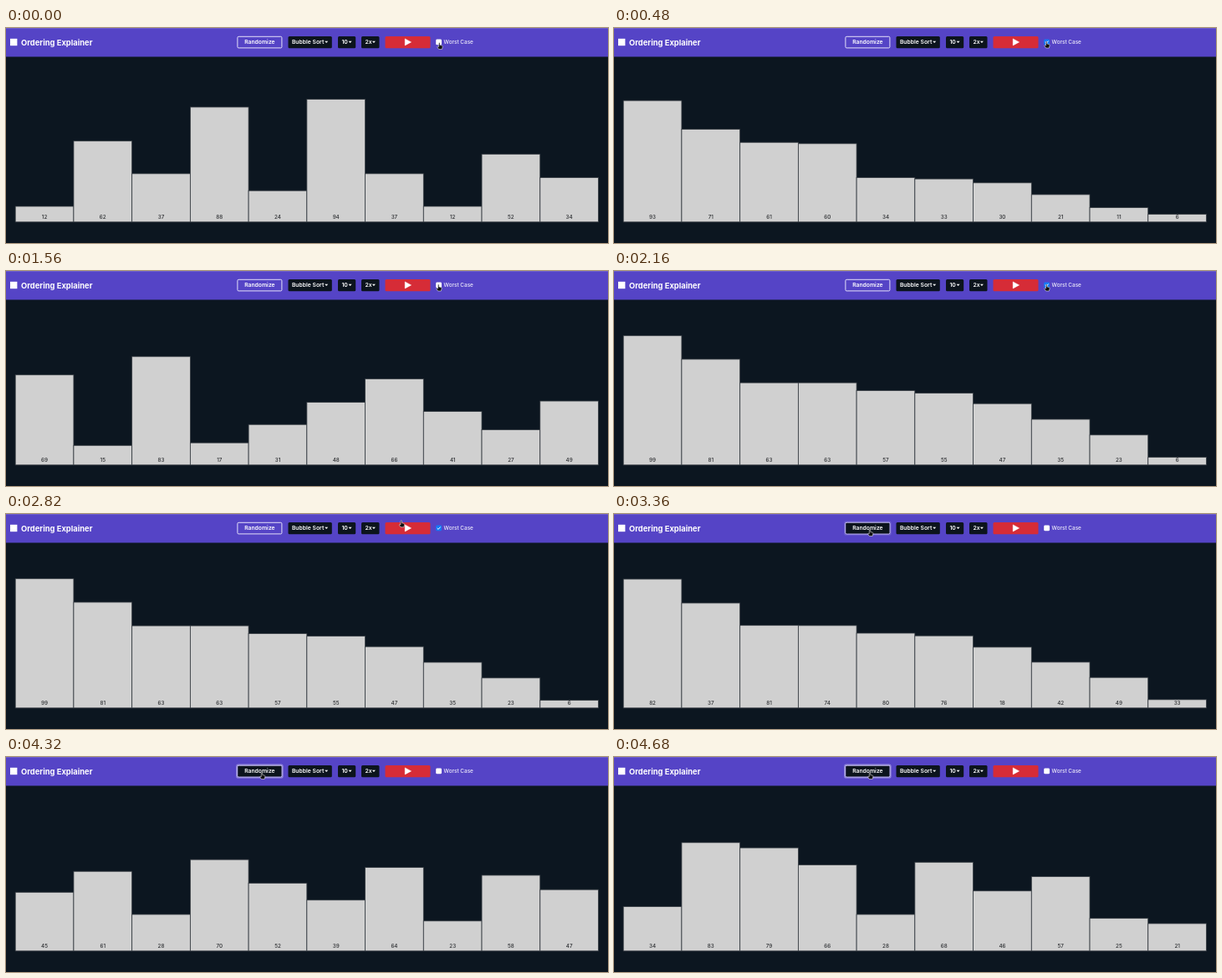
An HTML page for the animation above (4740 ms loop, 720 by 258 pixels).

```html
<!DOCTYPE html>
<html lang="en">
<head>
<meta charset="utf-8">
<title>Ordering Explainer</title>
<style>
  html, body { margin: 0; width: 100%; height: 100%; overflow: hidden; background: #0c1620; }
  svg { display: block; width: 100%; height: 100%; }
  text { font-family: Inter, "Open Sans", sans-serif; fill: #fff; }
  .brand { font-size: 9.4px; font-weight: 700; }
  .control { font-size: 6.8px; font-weight: 600; }
  .option { font-size: 6.4px; font-weight: 500; fill: #eeecfa; }
  .value { font-size: 6.3px; font-weight: 500; fill: #2b2d30; text-anchor: middle; }
  .bar { fill: #d0d0d0; stroke: #343a40; stroke-width: .8; }
  .dark { fill: #0c141d; }
</style>
</head>
<body>
<svg viewBox="0 0 720 258">
  <rect width="720" height="258" fill="#0c1620"/>
  <rect width="720" height="34.5" fill="#5544c6"/>
  <rect width="720" height=".7" fill="#7769cf"/>

  <rect x="5" y="12.8" width="8.4" height="8.4" fill="#fff"/>
  <text class="brand" x="18" y="20.6">Ordering Explainer</text>

  <rect id="glow" x="275.8" y="9.2" width="55.2" height="15.8" rx="2" fill="none" stroke="#fff" stroke-opacity=".4" stroke-width="1.2"/>
  <rect x="276.9" y="10.3" width="53" height="13.6" rx="1.3" fill="none" stroke="#f4f2ff" stroke-width=".9"/>
  <rect id="hover" class="dark" x="277.3" y="10.7" width="52.2" height="12.8" rx="1"/>
  <text class="control" x="303.4" y="19.2" text-anchor="middle">Randomize</text>

  <g id="menus"></g>
  <rect x="453.5" y="10" width="54" height="14.2" rx="1.5" fill="#d62c37"/>
  <path d="M477.2 12.9 L484.6 16.9 L477.2 20.9 Z" fill="#fff" stroke="#fff" stroke-width=".5" stroke-linejoin="round"/>

  <rect id="box" x="514.2" y="13.5" width="6.8" height="6.8" rx="1.4" fill="#fff"/>
  <path id="tick" d="M515.7 17 L517.1 18.4 L519.6 15.5" fill="none" stroke="#fff" stroke-width="1"/>
  <text class="option" x="523.6" y="19.1">Worst Case</text>

  <g id="bars"></g>

  <path id="cursor" fill="#111" stroke="#fff" stroke-width=".5" stroke-linejoin="round"
    d="M-.7 .5 Q0 -.4 .7 .5 V3 L3.2 3.6 Q4 3.9 3.9 4.9 L3.2 8 H-.6 L-2.5 5.3 Q-2.3 4.2 -.7 5 Z"/>
</svg>
<script>
const LOOP = 4740, LAG = 30, EASE_MS = 300;
const LEFT = 11.2, STEP = 69.73, BASE = 232.8, UNIT = 1.5667;

// [time, values, worst case ticked]
const steps = [
  [-1000, [12, 62, 37, 88, 24, 94, 37, 12, 52, 34], false],
  [60, [93, 71, 61, 60, 34, 33, 30, 21, 11, 6], true],
  [1080, [69, 15, 83, 17, 31, 48, 66, 41, 27, 49], false],
  [1680, [99, 81, 63, 63, 57, 55, 47, 35, 23, 6], true],
  [3323, [82, 37, 81, 74, 80, 76, 18, 42, 49, 33], false],
  [3940, [45, 61, 28, 70, 52, 39, 64, 23, 58, 47], false],
  [4330, [34, 83, 79, 66, 28, 68, 46, 57, 25, 21], false]
];

// [time, x, y]
const path = [
  [0, 518.3, 17.5], [400, 517.2, 16], [2400, 517.2, 16], [2640, 520, 7],
  [2760, 506, 6], [3000, 375, 13], [3180, 306, 18.5], [LOOP, 306, 18.5]
];

const $ = id => document.getElementById(id);

function add(parent, tag, attrs, text = "") {
  const el = document.createElementNS("http://www.w3.org/2000/svg", tag);
  for (const key in attrs) el.setAttribute(key, attrs[key]);
  el.textContent = text;
  parent.append(el);
  return el;
}

function addMenu(x, width, label) {
  add($("menus"), "rect", { class: "dark", x, y: 10, width, height: 14.2, rx: 1.5 });
  add($("menus"), "text", { class: "control", x: x + 4.4, y: 19.2 }, label);
  add($("menus"), "path", { d: `M${x + width - 8.6} 15.7h4l-2 2.2z`, fill: "#fff" });
}
addMenu(337.5, 52.3, "Bubble Sort");
addMenu(397, 21.2, "10");
addMenu(425, 21.5, "2x");

const bars = steps[0][1].map((_, i) => {
  const x = LEFT + i * STEP;
  return {
    rect: add($("bars"), "rect", { class: "bar", x, width: STEP }),
    label: add($("bars"), "text", { class: "value", x: x + STEP / 2, y: 229.2 })
  };
});

const clamp = p => Math.min(1, Math.max(0, p));
const mix = (a, b, p) => a + (b - a) * p;
const bezier = (a, b, s) => 3 * a * s * (1 - s) ** 2 + 3 * b * s * s * (1 - s) + s ** 3;

// CSS "ease": cubic-bezier(.25, .1, .25, 1)
function ease(p) {
  if (p <= 0 || p >= 1) return clamp(p);
  let lo = 0, hi = 1;
  for (let i = 0; i < 20; i++) {
    const mid = (lo + hi) / 2;
    if (bezier(.25, .25, mid) < p) lo = mid; else hi = mid;
  }
  return bezier(.1, 1, lo);
}

function cursorAt(t) {
  const i = path.findIndex(point => point[0] > t);
  const [t0, x0, y0] = path[i - 1], [t1, x1, y1] = path[i];
  const p = (t - t0) / (t1 - t0);
  return [mix(x0, x1, p), mix(y0, y1, p)];
}

function draw(t) {
  const now = steps.findLastIndex(step => step[0] <= t);
  const [start, values, worst] = steps[now];
  const before = steps[Math.max(0, now - 1)][1];
  const p = ease((t - start - LAG) / EASE_MS);

  bars.forEach(({ rect, label }, i) => {
    const height = mix(before[i], values[i], p) * UNIT;
    rect.setAttribute("y", BASE - height);
    rect.setAttribute("height", height);
    label.textContent = values[i];
  });

  $("box").setAttribute("fill", worst ? "#1479f5" : "#fff");
  $("tick").setAttribute("opacity", worst ? 1 : 0);
  $("hover").setAttribute("opacity", clamp((t - 3120) / 150));
  $("glow").setAttribute("opacity", clamp((t - 3300) / 150));
  $("cursor").setAttribute("transform", `translate(${cursorAt(t)})`);
}

const begin = performance.now();
function tick() {
  draw((performance.now() - begin) % LOOP);
  requestAnimationFrame(tick);
}
tick();
</script>
</body>
</html>
```
